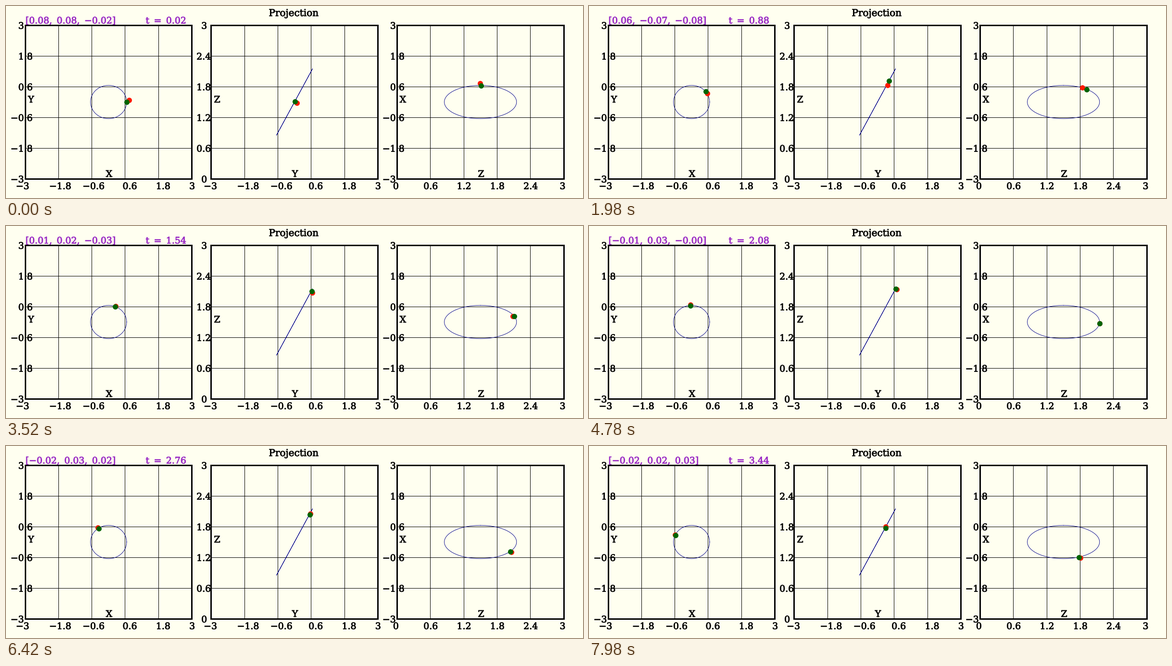
These frames come from a looping animation (1200x400 px, 8 s). A matplotlib script:

```python
import numpy as np
import matplotlib.pyplot as plt
from matplotlib.animation import FuncAnimation
from matplotlib.patches import PathPatch
from matplotlib.path import Path
from matplotlib.textpath import TextPath

PAPER, INK, ORCHID = "#fffff0", "black", "#9929c4"
NAVY, RED, GREEN = "#00008b", "#ff1a00", "#006400"
PX = 0.72                      # points per pixel at 100 dpi
TYPE = 18.9                    # lettering size in pixels
EN_SPACE, MINUS = "\u2002", "\u2212"

TOP, BOTTOM, WIDTH, PITCH = 40, 360, 346.66, 386.68
LEFT = [40 + PITCH * i for i in range(3)]
PAIRS = [(0, 1), (1, 2), (2, 0)]       # coordinates across and up
NAMES, LOW, HIGH = "XYZ", (-3, -3, 0), 3

fig = plt.figure(figsize=(12, 4), dpi=100, facecolor=PAPER)
ax = fig.add_axes([0, 0, 1, 1])
ax.set_xlim(-0.5, 1199.5)              # whole numbers are pixel centres
ax.set_ylim(399.5, -0.5)
ax.axis("off")


def letter(text, x, y, size=TYPE, centered=False):
    """Outline of a text whose baseline starts (or is centred) at x, y."""
    text = text.replace("-", MINUS).replace(" ", EN_SPACE)
    shape = TextPath((0, 0), text, size=size, prop={"family": "DejaVu Serif"})
    if centered:
        x -= (shape.vertices[:, 0].min() + shape.vertices[:, 0].max()) / 2
    return Path(shape.vertices * [1, -1] + [x, y], shape.codes)


def ink(paths, color):
    patch = PathPatch(Path.make_compound_path(*paths), fc=color, ec=color,
                      lw=0.9 * PX, joinstyle="round", snap=False)
    return ax.add_patch(patch)


def stroke(x, y, color, width):
    ax.plot(x, y, color=color, lw=width * PX, snap=False,
            solid_capstyle="projecting", solid_joinstyle="miter")


def project(p):
    """Pixel position of a 3D point in each of the three panels."""
    out = []
    for left, (a, b) in zip(LEFT, PAIRS):
        x = left + (p[a] - LOW[a]) / (HIGH - LOW[a]) * WIDTH
        y = BOTTOM - (p[b] - LOW[b]) / (HIGH - LOW[b]) * (BOTTOM - TOP)
        out.append((x, y))
    return np.array(out)


def orbit(angle):
    c, s = 0.65 * np.cos(angle), 0.65 * np.sin(angle)
    return np.array([c, s, 1.5 + s])


def error(t):
    """Tracking error: a start-up transient fading into a slow lag."""
    ex = 0.112 * np.exp(-0.85 * (t - 0.3) ** 2) - 0.022
    ey = (0.026 * np.exp(-0.65 * (t - 2.7) ** 2)
          - 0.235 * np.exp(-1.35 * t) * np.sin(2.4 * (t - 0.16)))
    ez = 0.04 - 0.3066 * np.exp(-0.95 * t) + 0.257 * np.exp(-3.24 * t)
    return np.array([ex, ey, ez])


def tick_shift(text, signed, across, panel):
    if signed:
        first, extra = (6, 14 - 4 * panel) if across else (15, 16)
        return -first - extra * text.startswith("-")
    first, extra = (9, 3) if across else (21, 5)
    return -first - extra * (len(text) - 1)


labels = [letter("Projection", 597.5, 20.5, 20, centered=True)]
for i, (left, (a, b)) in enumerate(zip(LEFT, PAIRS)):
    right = left + WIDTH
    for k in range(6):
        x, y = left + WIDTH * k / 5, TOP + 64 * k
        if 0 < k < 5:
            stroke([int(x)] * 2, [TOP, BOTTOM], INK, 1)
            stroke([int(left), int(right)], [y, y], INK, 1)
        across = f"{LOW[a] + (HIGH - LOW[a]) * k / 5:.3g}"
        up = f"{HIGH - (HIGH - LOW[b]) * k / 5:.3g}"
        labels.append(letter(across, x + tick_shift(across, LOW[a] < 0, True, i), 381))
        labels.append(letter(up, left + tick_shift(up, LOW[b] < 0, False, i), y + 7))
    labels.append(letter(NAMES[a], left + WIDTH / 2 + 0.5, 355.5, centered=True))
    labels.append(letter(NAMES[b], left + 11.5, 200.5, centered=True))
    l, r = int(left), int(right)
    stroke([l, r, r, l, l], [TOP, TOP, BOTTOM, BOTTOM, TOP], INK, 3)

for x, y in project(orbit(np.linspace(0, 2 * np.pi, 181))):
    stroke(x - 0.5, y - 0.5, NAVY, 0.9)
ink(labels, INK)


def marker(color):
    return ax.plot([], [], "o", color=color, ms=11 * PX, mew=0)[0]


actual, goal = marker(RED), marker(GREEN)
readout = ink([letter("0", 0, 0)], ORCHID)


def update(frame):
    # steps run in threes over seven ticks; the middle one is held for five
    cycle, tick = divmod(frame, 7)
    step = 3 * cycle + (tick > 0) + (tick > 5)
    t = 0.02 * (step + 1)
    point, e = orbit(np.pi / 4 * t), error(t)
    goal.set_data(*np.floor(project(point)).T)
    actual.set_data(*np.floor(project(point + e)).T)
    vector = "[" + ", ".join(f"{v:.2f}" for v in e) + "]"
    readout.set_path(Path.make_compound_path(
        letter(vector, 40, 36), letter(f"t = {t:.2f}", 290, 36)))
    return actual, goal, readout


anim = FuncAnimation(fig, update, frames=400, interval=20, repeat=True,
                     repeat_delay=0, blit=False)
plt.show()
```
